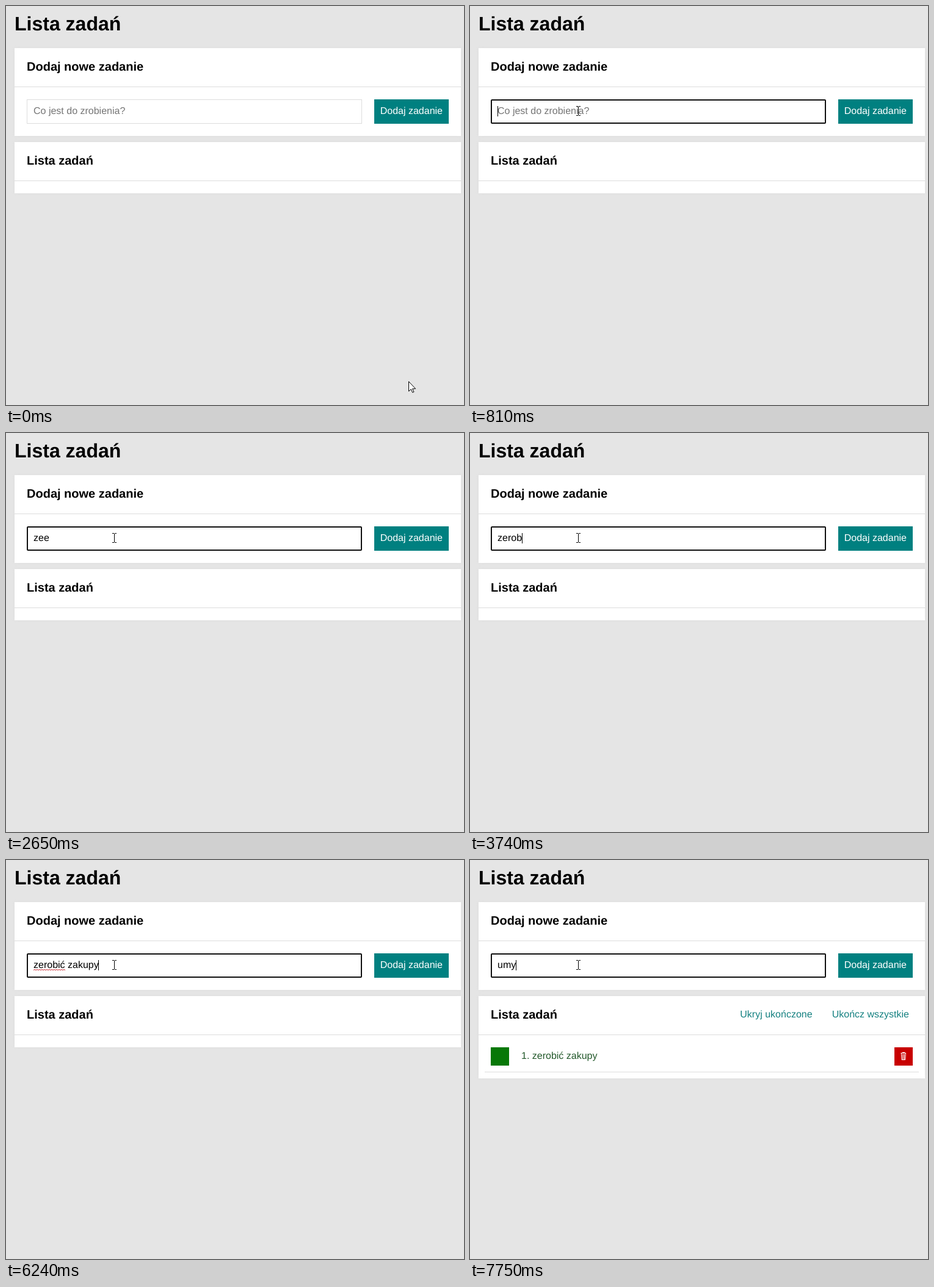
Write an HTML page that moves like this. It is 750 px wide and 654 px high and loops after 8000 ms.

```html
<!DOCTYPE html>
<html lang="pl">
<head>
<meta charset="utf-8">
<title>Lista zadań</title>
<style>
  html, body { margin: 0; width: 100%; height: 100%; overflow: hidden; background: #e5e5e5; }
  body { position: relative; font: 16px/17px "Liberation Sans", Arial, sans-serif; text-rendering: geometricPrecision; }
  body * { position: absolute; left: 0; top: 0; box-sizing: border-box; margin: 0; white-space: nowrap; }
  svg { overflow: visible; }
  h1 { left: 14px; top: 11px; font-size: 32px; line-height: 36px; }
  section { left: 14px; width: 731px; background: #fff; box-shadow: 0 0 5px #ddd; }
  section::before { content: ""; position: absolute; left: 0; top: 63px; width: 100%; height: 1px; background: #ddd; }
  h2 { left: 20px; top: 20px; font-size: 20px; line-height: 22px; }
  #add { top: 69px; height: 144px; }
  #list { top: 223px; height: 84px; }
  #list.filled { height: 135px; }
  #list:not(.filled) #tasks { display: none; }
  #field { left: 20px; top: 84px; width: 549px; height: 40px; border: 1px solid #ddd; }
  #field.focus { border: 2px solid #101010; border-radius: 2px; }
  #hint, #typed { left: 31px; top: 95px; }
  #typed { white-space: pre; }
  #hint { color: #757575; }
  #caret { top: 95px; width: 1px; height: 17px; background: #000; }
  #add button { left: 589px; top: 84px; width: 122px; height: 40px; padding: 0; border: 0; background: #008080; }
  #label { left: 598.7px; top: 95px; color: #fff; }
  .link { top: 22px; color: #148080; }
  .box { top: 84px; width: 30px; height: 30px; }
  #rule { left: 10px; top: 124px; width: 711px; height: 1px; background: #ddd; }
</style>
</head>
<body>
<h1>Lista zadań</h1>

<section id="add">
  <h2>Dodaj nowe zadanie</h2>
  <div id="field"></div>
  <span id="hint">Co jest do zrobienia?</span>
  <span id="typed"></span>
  <svg id="squiggle" style="left:31px;top:110px" width="52" height="2"><path fill="none" stroke="#c8232c"/></svg>
  <i id="caret"></i>
  <button></button>
  <span id="label">Dodaj zadanie</span>
</section>

<section id="list">
  <h2>Lista zadań</h2>
  <div id="tasks">
    <span class="link" style="left:428.3px">Ukryj ukończone</span>
    <span class="link" style="left:578.7px">Ukończ wszystkie</span>
    <div class="box" style="left:20px;background:#077807"></div>
    <span style="left:70px;top:90px;color:#23592b">1. zerobić zakupy</span>
    <div class="box" style="left:681px;background:#c80000">
      <svg width="30" height="30" fill="none" stroke="#fff">
        <path d="M10.5 9.5H19M13 8.5H17M11.3 10L12 20.5H17.7L18.4 10"/>
        <path d="M13.4 11V20M15 11V20M16.5 11V20" stroke-width=".8"/>
      </svg>
    </div>
    <div id="rule"></div>
  </div>
</section>

<svg id="arrow" width="12" height="19"><path d="M.5 .5V16.5L4.3 13.1L6.7 18.5L9 17.5L6.6 12.3H11.6Z" fill="#fff" stroke="#000"/></svg>
<svg id="beam" width="7" height="16"><path d="M0 .5H3M4 .5H7M3.5 1V15M0 15.5H3M4 15.5H7" fill="none" stroke="#000"/></svg>

<script>
const LOOP = 8000, FOCUS = 810, ADDED = 6570;
const $ = id => document.getElementById(id);

// [start, typed text, caret shown]
const typing = [
  [0, "", 0], [FOCUS, "", 1], [1400, "", 0],
  [1810, "z", 1], [1980, "ze", 1], [2070, "zee", 1], [2650, "zee", 0], [2830, "ze", 0],
  [3080, "zer", 1], [3410, "zero", 1], [3740, "zerob", 1], [3990, "zerobi", 1],
  [4400, "zerobić", 1], [4570, "zerobić ", 1], [4750, "zerobić z", 1], [4900, "zerobić za", 1],
  [5080, "zerobić zak", 1], [5250, "zerobić zaku", 1], [5660, "zerobić zakup", 1],
  [6160, "zerobić zakup", 0], [6240, "zerobić zakupy", 1],
  [ADDED, "", 1], [6820, "", 0], [7170, "u", 1], [7420, "um", 1], [7750, "umy", 1]
];

// [start, pointer x, pointer y, shape]
const pointer = [
  [0, 659, 615, "arrow"], [80, 632, 586, "arrow"], [160, 530, 488, "arrow"],
  [240, 385, 352, "arrow"], [330, 262, 243, "arrow"], [410, 197, 196, "arrow"],
  [490, 175, 159, "beam"], [650, 175, 162, "beam"], [740, 174, 164, "beam"]
];

const at = (steps, t) => steps.findLast(step => step[0] <= t);
const show = (id, on) => { $(id).style.visibility = on ? "visible" : "hidden"; };

let wave = "M0 1.5";
for (let x = 2; x <= 52; x += 2) wave += `L${x} ${x % 4 ? 0.5 : 1.5}`;
$("squiggle").firstChild.setAttribute("d", wave);

function draw(t) {
  const [, text, caret] = at(typing, t);
  const [, x, y, shape] = at(pointer, t);
  $("typed").textContent = text;
  $("caret").style.left = 31 + Math.floor($("typed").getBoundingClientRect().width + 0.02) + "px";
  show("caret", caret);
  show("hint", !text);
  show("squiggle", text.startsWith("zerobić "));
  $("field").className = t >= FOCUS ? "focus" : "";
  $("list").className = t >= ADDED ? "filled" : "";
  for (const id of ["arrow", "beam"]) show(id, id === shape);
  $(shape).style.left = x + "px";
  $(shape).style.top = y + "px";
}

const start = performance.now();
function tick() {
  draw((performance.now() - start) % LOOP);
  requestAnimationFrame(tick);
}
tick();
</script>
</body>
</html>
```
